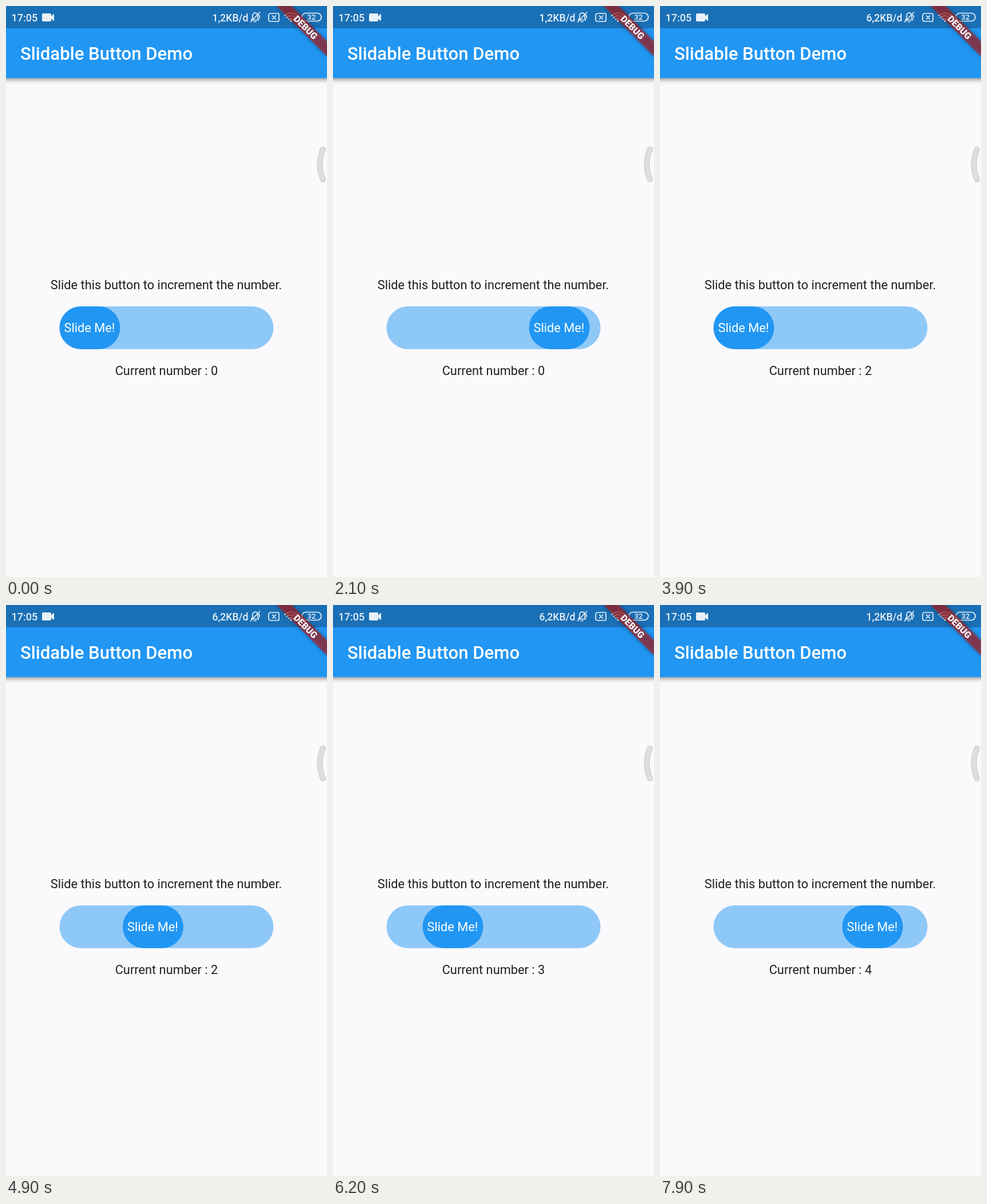
Recreate the animation shown at these times as an HTML page. Size 561 by 998 pixels, loop 8000 ms.

```html
<!DOCTYPE html>
<html lang="en">
<head>
<meta charset="utf-8">
<title>Slidable Button Demo</title>
<style>
  html, body { margin: 0; width: 100%; height: 100%; overflow: hidden; background: #faf9fc; }
  svg { display: block; width: 100%; height: 100%; font-family: Roboto, sans-serif; }
  .bar { filter: drop-shadow(0 3px 3px #0004) drop-shadow(0 1px 5px #0003); }
  .body { font-size: 21.8px; fill: #1f1f20; text-anchor: middle; }
  .status { font-size: 18px; font-weight: 500; fill: #e8f1f8; }
  .icon { fill: none; stroke: #e8f1f8; stroke-width: 1.7; stroke-linecap: round; stroke-linejoin: round; }
  .banner { filter: drop-shadow(0 0 4px #0008); }
</style>
</head>
<body>
<svg viewBox="0 0 561 998">
  <rect width="561" height="998" fill="#faf9fc"/>

  <rect class="bar" x="-20" y="0" width="601" height="126" fill="#2196f3"/>
  <rect width="561" height="39" fill="#1a70b6"/>
  <text x="24.9" y="94" font-size="31.17" font-weight="500" fill="#fff">Slidable Button Demo</text>

  <g class="status">
    <text x="9.5" y="27">17:05</text>
    <text id="speed" x="360.5" y="27" font-size="17.6" style="font-size:17.6px"></text>
    <rect x="63" y="13" width="16" height="14" rx="2"/>
    <path d="M78 18.5 84 13.5V26.5L78 21.5Z"/>
    <text x="534" y="24.3" text-anchor="middle" style="font-size:13px">32</text>
  </g>
  <g class="icon">
    <path d="M429 24.5H441.5L440 21.5V17C440 10.5 431 10.5 431 17V21.5ZM433.5 27.5H437M427.5 28 443.5 11M442 15.5Q444 18 443 21"/>
    <path d="M463 13H475Q477 13 477 15V25Q477 27 475 27H463Q459 27 459 23V17Q459 13 463 13ZM465.5 17.2 471.5 23M471.5 17.2 465.5 23"/>
    <path stroke-width="2" d="M487 17Q498 7.5 509 17M490.3 20.3Q498 13.5 505.7 20.3M493.7 23.5Q498 20 502.3 23.5"/>
    <circle cx="498" cy="26" r="1"/>
    <rect x="517" y="12.5" width="34" height="14" rx="7"/>
  </g>

  <g transform="translate(561 0) rotate(45)">
    <rect class="banner" x="-62.3" y="43.6" width="124.6" height="18.7" fill="#b71c1c" fill-opacity=".63"/>
    <text y="58.6" font-size="15.9" font-weight="900" text-anchor="middle" fill="#fff">DEBUG</text>
  </g>

  <g fill="none" stroke-linecap="round">
    <path d="M554 250.5Q543 277 554 303" stroke="#c6c6c8" stroke-width="10"/>
    <path d="M554 250.5Q543 277 554 303" stroke="#dededf" stroke-width="8.4"/>
  </g>

  <text class="body" x="280" y="495.2">Slide this button to increment the number.</text>
  <rect x="93.5" y="525" width="374" height="74.8" rx="37.4" fill="#8ec8f7"/>
  <g id="button">
    <rect x="93.5" y="525" width="106" height="74.8" rx="37.4" fill="#2196f3"/>
    <text class="body" x="146" y="570" style="fill:#fff">Slide Me!</text>
  </g>
  <text class="body" id="count" x="280.5" y="645"></text>
</svg>
<script>
  const LOOP = 8000, STEP = 100;

  // Each drag: [time, offset] points; the button snaps home at the last time.
  const drags = [
    [[1500, 0], [2100, 249], [2300, 268], [2500, 268]],
    [[3200, 0], [3400, 69.5], [3700, 268], [3800, 268]],
    [[4600, 0], [4900, 110.5], [5300, 268], [5400, 268]],
    [[6100, 0], [6200, 63], [6600, 268], [6700, 268]],
    [[7200, 0], [7900, 225], [8000, 268]],
  ];
  const endOf = drag => drag[drag.length - 1][0];

  function offsetAt(time) {
    const drag = drags.find(d => time >= d[0][0] && time < endOf(d));
    if (!drag) return 0;
    const i = drag.findIndex(([t]) => t > time);
    const [t0, x0] = drag[i - 1], [t1, x1] = drag[i];
    return x0 + (x1 - x0) * (time - t0) / (t1 - t0);
  }

  const [button, count, speed] = ['button', 'count', 'speed'].map(id => document.getElementById(id));

  function draw(time) {
    button.setAttribute('transform', `translate(${offsetAt(time)} 0)`);
    count.textContent = 'Current number : ' + drags.filter(d => time >= endOf(d)).length;
    speed.textContent = (time >= 2800 && time < 6800 ? '6,2' : '1,2') + 'KB/d';
  }

  const start = performance.now();
  function tick() {
    const time = (performance.now() - start) % LOOP;
    draw(Math.floor(time / STEP) * STEP);
    requestAnimationFrame(tick);
  }
  tick();
</script>
</body>
</html>
```
